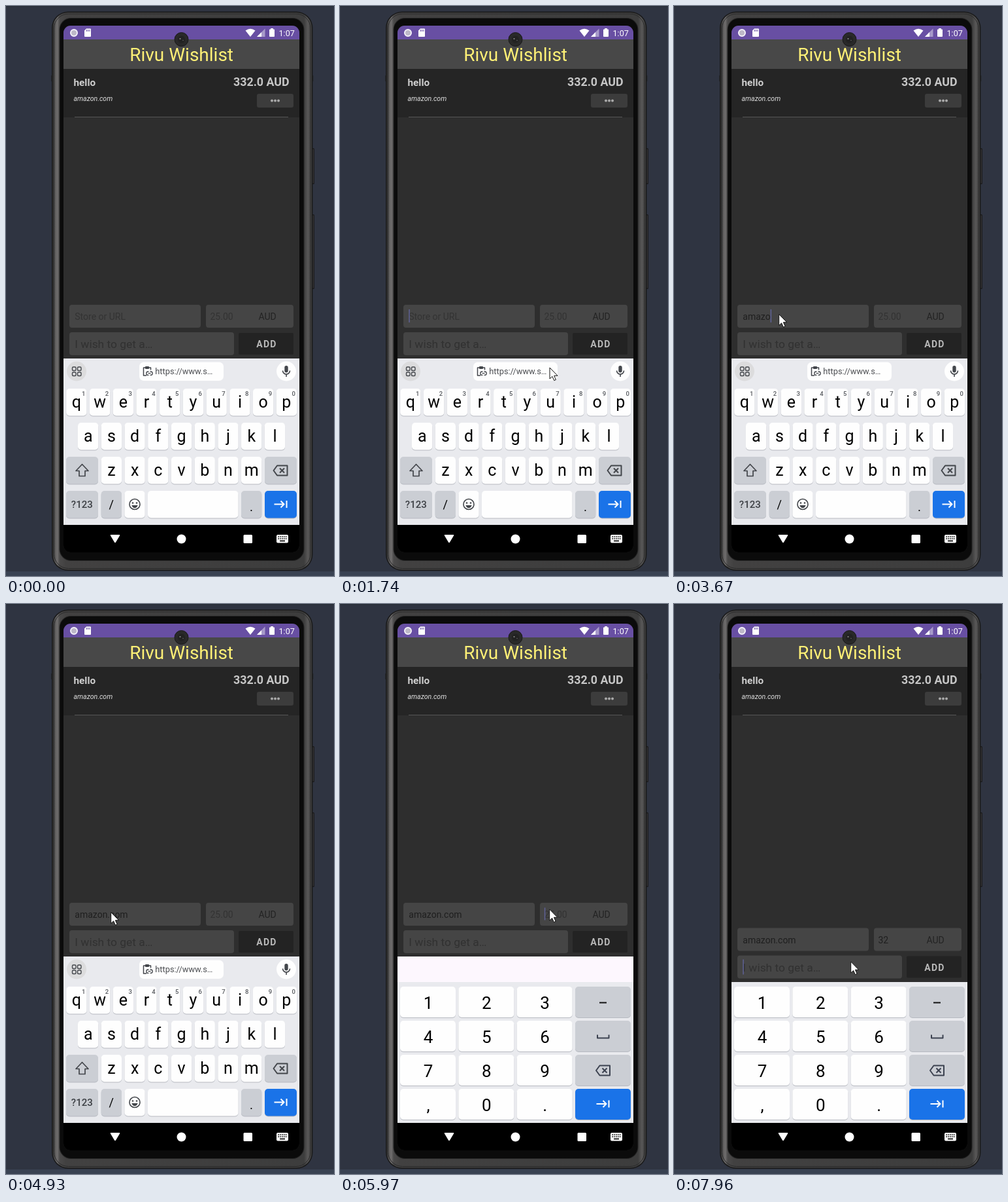
These frames come from a looping animation (502 by 870 pixels, 8000 ms). An HTML page:

```html
<!DOCTYPE html>
<html lang="en">
<head>
<meta charset="utf-8">
<title>Wishlist form</title>
<style>
  html, body { margin: 0; width: 100%; height: 100%; overflow: hidden; background: #2f3441; }
  svg { display: block; width: 100vw; height: 100vh; font-family: Roboto, sans-serif; }
  text { white-space: pre; }
</style>
</head>
<body>
<svg id="stage" viewBox="0 0 502 870" xmlns="http://www.w3.org/2000/svg">
  <defs>
    <linearGradient id="metal" gradientUnits="userSpaceOnUse" x1="72" x2="468" y1="0" y2="0">
      <stop offset="0" stop-color="#333"/>
      <stop offset=".006" stop-color="#545353"/>
      <stop offset=".016" stop-color="#706e6e"/>
      <stop offset=".026" stop-color="#4a4949"/>
      <stop offset=".05" stop-color="#424141"/>
      <stop offset=".97" stop-color="#3d3d3d"/>
      <stop offset=".985" stop-color="#595858"/>
      <stop offset="1" stop-color="#3a3a3a"/>
    </linearGradient>
    <clipPath id="screen"><rect x="88" y="30" width="361" height="804" rx="11"/></clipPath>
  </defs>
  <rect y="863" width="502" height="7" fill="#394252"/>
  <rect width="502" height="1.5" fill="#292e38"/>
  <g id="phone"></g>
  <g clip-path="url(#screen)">
    <g id="app"></g>
    <g id="form"></g>
    <g id="letters"></g>
    <g id="numbers"></g>
    <g id="nav"></g>
  </g>
  <g id="camera"></g>
  <path id="pointer" d="M0 0V17L3.9 13.4L6.7 19.6L9.4 18.4L6.7 12.3H12Z" fill="#fff" stroke="#111" stroke-width="1" stroke-linejoin="round"/>
</svg>
<script>
const LOOP = 8000;
const $ = id => document.getElementById(id);

function add(parent, tag, attrs, content) {
  const el = document.createElementNS("http://www.w3.org/2000/svg", tag);
  for (const k in attrs) el.setAttribute(k, attrs[k]);
  if (content !== undefined) el.textContent = content;
  parent.appendChild(el);
  return el;
}
const box = (g, x, y, width, height, fill, rx = 0, more = {}) =>
  add(g, "rect", { x, y, width, height, fill, rx, ...more });
const dot = (g, cx, cy, r, fill, more = {}) => add(g, "circle", { cx, cy, r, fill, ...more });
const shape = (g, d, fill) => add(g, "path", { d, fill });
const line = (g, d, stroke, w = 1.5) =>
  add(g, "path", { d, stroke, fill: "none", "stroke-width": w, "stroke-linejoin": "round" });
const label = (g, s, x, y, size, fill, more = {}) =>
  add(g, "text", { x, y, "font-size": size, fill, ...more }, s);
const MID = { "text-anchor": "middle" };
const END = { "text-anchor": "end" };

function sideButton(g, y, h) {
  box(g, 467, y, 5, h, "#1b1b1c", 1.5);
  box(g, 469.5, y + 1.5, 1, h - 3, "#4b4b4c");
}

function drawPhone() {
  const g = $("phone");
  sideButton(g, 217, 55);
  sideButton(g, 318, 114);
  box(g, 69, 106, 2, 9, "#26282c");
  box(g, 468.5, 106, 2, 9, "#26282c");
  box(g, 70, 8.5, 399.5, 853.5, "#1a1a1a", 25);
  box(g, 71.5, 10, 396.5, 850.5, "url(#metal)", 23.5);
  box(g, 73.5, 12, 392.5, 846.5, "none", 22, { stroke: "#2a2a2a", "stroke-width": 1 });
  box(g, 81.5, 18, 375, 829, "#262626", 18);
  box(g, 82.5, 19, 373, 827, "#0b0b0b", 17);

  const c = $("camera");
  dot(c, 268.5, 51, 10.5, "#292929", { stroke: "#191919", "stroke-width": 1 });
  dot(c, 268.5, 51, 5.5, "#222");
  dot(c, 266.5, 50, 1.1, "#8a8a8a");
  dot(c, 271, 52.5, .8, "#656565");
}

function drawApp() {
  const g = $("app");
  box(g, 88, 30, 361, 804, "#2e2e2e");
  box(g, 88, 30, 361, 21, "#684fa3");
  dot(g, 104, 41, 5, "#bdb8c8", { stroke: "#f4f1fa", "stroke-width": 2 });
  shape(g, "M123 34.5H129Q130 34.5 130 35.5V46Q130 47 129 47H121Q120 47 120 46V37.5Z", "#fff");
  line(g, "M123.5 36V39M125.7 36V39M127.9 36V39", "#684fa3", 1);
  shape(g, "M366.5 37.5Q374 32 381.5 37.5L374 47Z", "#fff");
  shape(g, "M396.5 34.5V47H384Z", "#a79ac9");
  shape(g, "M391 40V47H384Z", "#fff");
  box(g, 403, 35.5, 8, 11.5, "#fff", 1);
  box(g, 405.2, 34, 3.6, 3, "#fff");
  label(g, "1:07", 417.5, 45.5, 12.6, "#fff");

  box(g, 88, 51, 361, 45, "#484848");
  label(g, "Rivu Wishlist", 348, 84, 28, "#fff176", END);

  box(g, 88, 96, 361, 74, "#252525");
  label(g, "hello", 103.5, 122, 15.3, "#cecece", { "font-weight": 700 });
  label(g, "332.0 AUD", 433.6, 122, 17.8, "#c6c6c6", { ...END, "font-weight": 700 });
  label(g, "amazon.com", 103.5, 145, 10.6, "#dedede", { "font-style": "italic" });
  box(g, 384, 134, 56, 21, "#3c3c3c", 3);
  for (const x of [407, 412, 417]) dot(g, x, 144.5, 2, "#a9a9a9");
  box(g, 105, 169, 327, 1, "#565656");
}

const field = {};
function drawForm() {
  const g = $("form");
  const fill = "#454545";
  box(g, 97, 456, 201, 35, fill, 4);
  box(g, 306, 456, 134, 35, fill, 4);
  box(g, 97, 498, 252, 35, fill, 4);
  field.store = label(g, "", 105.3, 479, 14, "");
  field.price = label(g, "", 312.5, 479, 14, "");
  label(g, "AUD", 386.5, 479, 14, "#232323");
  label(g, "I wish to get a…", 105.3, 522, 17.4, "#313131");
  box(g, 356, 499, 84, 33, "#232323", 2);
  label(g, "ADD", 399, 521, 14, "#b9b9b9", { ...MID, "font-weight": 700, "letter-spacing": 1.25 });
  field.caret = box(g, 0, 0, 1.5, 20, "#5f6296");
}

const LIGHT = "#fefefe", GREY = "#cbced4", BLUE = "#1a73e8";
function key(g, x, y, w, h, fill) {
  box(g, x, y + 1, w, h, "#b7bac1", 5);
  box(g, x, y, w, h, fill, 5);
}
function eraseIcon(g, x, y, color) {
  line(g, `M${x - 10.5} ${y}L${x - 5} ${y - 7.5}H${x + 10.5}V${y + 7.5}H${x - 5}Z`, color, 2);
  line(g, `M${x - 1} ${y - 3.5}l7 7m0 -7l-7 7`, color, 2);
}
function nextIcon(g, x, y) {
  line(g, `M${x - 10} ${y}H${x + 5}M${x} ${y - 5}L${x + 5} ${y}L${x} ${y + 5}M${x + 9} ${y - 5.5}V${y + 5.5}`, "#fff", 2);
}

function drawLetters() {
  const g = $("letters"), ink = "#43464b";
  box(g, 88, 538, 361, 254, "#e9eaee");
  dot(g, 108, 557.5, 15, "#dcdcdd");
  for (const x of [101.5, 109.5]) for (const y of [551, 559])
    box(g, x, y, 5.5, 5.5, "none", 1.5, { stroke: ink, "stroke-width": 1.4 });
  box(g, 204, 543.5, 129, 28.5, LIGHT, 7);
  line(g, "M214 552H210.5V564H215M218 552H221.5V555.5", ink, 1.5);
  box(g, 213, 550, 6, 4, ink, 1);
  line(g, "M218.5 558H217.5a2.7 2.7 0 0 0 0 5.4H218.5M220.5 558H221.5a2.7 2.7 0 0 1 0 5.4H220.5M217.5 560.7H221.5", ink, 1.3);
  label(g, "https://www.s…", 228.3, 562, 12.8, "#4b4d51");
  dot(g, 429, 557.5, 15, LIGHT);
  box(g, 426.3, 549, 5.4, 10.5, ink, 2.7);
  line(g, "M423.5 556.5a5.5 5.5 0 0 0 11 0M429 562V566", ink, 1.6);

  const pitch = 35.72;
  const row = (chars, x, y, each) => [...chars].forEach((c, i) => {
    const left = x + i * pitch;
    key(g, left, y, 31.3, 41.5, LIGHT);
    label(g, c, left + 15.7, y + 28.5, 25, "#000", MID);
    if (each) each(i, left, y);
  });
  row("qwertyuiop", 92.2, 584, (i, x, y) =>
    label(g, (i + 1) % 10, x + 26.5, y + 10.5, 9.5, "#55585d", { ...MID, "font-weight": 500 }));
  row("asdfghjkl", 110, 636);
  row("zxcvbnm", 145.7, 688);

  key(g, 92, 688, 49, 41.5, GREY);
  line(g, "M116.5 699.5L107 709.5H112V717.5H121V709.5H126Z", ink, 1.7);
  key(g, 396, 688, 49, 41.5, GREY);
  eraseIcon(g, 420, 709, ink);

  key(g, 92, 740, 49, 41.5, GREY);
  label(g, "?123", 116.3, 766, 15, "#3d4045", { ...MID, "font-weight": 500 });
  key(g, 145.7, 740, 31.3, 41.5, GREY);
  label(g, "/", 161.3, 767, 18, "#000", MID);
  key(g, 181.4, 740, 31.3, 41.5, LIGHT);
  dot(g, 197, 760.5, 8, "none", { stroke: ink, "stroke-width": 1.6 });
  dot(g, 194, 758.5, 1.3, ink);
  dot(g, 200, 758.5, 1.3, ink);
  shape(g, "M192.3 762H201.7Q200 766.3 197 766.3T192.3 762", ink);
  key(g, 217, 740, 138.5, 41.5, LIGHT);
  key(g, 360, 740, 31.3, 41.5, GREY);
  label(g, ".", 375.6, 771, 19, "#000", MID);
  key(g, 396, 740, 49, 41.5, BLUE);
  nextIcon(g, 420.5, 760.5);
}

let strip;
function drawNumbers() {
  const g = $("numbers"), ink = "#3c4250";
  strip = box(g, 88, 538, 361, 39, "#fdf7fe");
  box(g, 88, 577, 361, 215, "#e9eaee");
  ["123", "456", "789", ",0."].forEach((chars, r) => {
    const y = 584 + r * 52;
    [...chars].forEach((c, i) => {
      const x = 92 + i * 89.3;
      key(g, x, y, 85, 47, LIGHT);
      label(g, c, x + 43, y + 33.5, 26, "#000", MID);
    });
    key(g, 360, y, 85, 47, r < 3 ? GREY : BLUE);
  });
  line(g, "M397 608.5H408", "#111", 2);
  line(g, "M394 657.5V662.5H411.5V657.5", ink, 2);
  eraseIcon(g, 402.5, 712, ink);
  nextIcon(g, 402.5, 763);
}

function drawNav() {
  const g = $("nav");
  box(g, 88, 792, 361, 42, "#000");
  shape(g, "M160.5 807H173.5Q175 807 174 808.5L168 818.5Q167 820 166 818.5L160 808.5Q159 807 160.5 807Z", "#fff");
  dot(g, 268.5, 813.5, 7, "#fff");
  box(g, 363.5, 807, 13.5, 13, "#fff", 1.5);
  box(g, 414, 807, 18, 12.5, "#fff", 2);
  for (const y of [809.3, 812.3])
    for (let i = 0; i < 5; i++) box(g, 416.2 + i * 2.9, y, 1.6, 1.6, "#000");
  box(g, 419, 815.6, 8, 1.7, "#000");
}

// Pointer path: time, x, y
const path = [
  [370, 326, 607], [510, 226, 540], [700, 226, 540], [1120, 119.7, 508.5], [1540, 226, 538],
  [1600, 226, 538], [1740, 321, 552], [1870, 240, 490], [1935, 175, 460], [2000, 160.7, 470.5],
  [4930, 160.7, 470.5], [5480, 308.5, 459], [5679, 308.5, 459], [5680, 320.7, 454.5], [5899, 320.7, 454.5],
  [5900, 320.7, 466], [7080, 320.7, 466], [7760, 270.7, 546]
];
function pointerAt(t) {
  const i = path.findIndex(p => p[0] > t);
  if (i < 0) return path[path.length - 1].slice(1);
  const a = path[i - 1], b = path[i];
  const f = Math.floor((t - a[0]) / 70) * 70 / (b[0] - a[0]);
  return [a[1] + (b[1] - a[1]) * f, a[2] + (b[2] - a[2]) * f];
}

const typing = {
  store: { text: "amazon.com", hint: "Store or URL", keys: [2990, 3190, 3340, 3540, 3670, 3940, 4200, 4290, 4380, 4470] },
  price: { text: "32", hint: "25.00", keys: [6500, 6630] }
};
function typeField(name, t) {
  const { text, hint, keys } = typing[name], el = field[name];
  const n = keys.filter(k => t >= k).length;
  el.textContent = n ? text.slice(0, n) : hint;
  el.setAttribute("fill", n ? "#1f1f1f" : "#333");
  return n ? el.getComputedTextLength() : 0;
}

// Times when the caret shows
const blink = {
  store: [[460, 960], [1460, 1960], [2460, 4930], [5430, 5900]],
  price: [[5900, 6430], [6500, 7080], [7580, 7760]],
  wish: [[7760, LOOP]]
};
const show = (el, on) => el.setAttribute("visibility", on ? "visible" : "hidden");

function render(t) {
  const numeric = t >= 5970, lowered = t >= 6020;
  show($("letters"), !numeric);
  $("numbers").setAttribute("display", numeric ? "inline" : "none");
  show(strip, !lowered);
  $("form").setAttribute("transform", `translate(0 ${lowered ? 38.5 : 0})`);

  const carets = {
    store: [105.3 + typeField("store", t), 463, 20],
    price: [312.8 + typeField("price", t), 463.5, 19],
    wish: [105.3, 504, 23]
  };
  const on = Object.keys(blink).find(k => blink[k].some(([a, b]) => t >= a && t < b));
  show(field.caret, on);
  if (on) ["x", "y", "height"].forEach((k, i) => field.caret.setAttribute(k, carets[on][i]));

  const moving = t >= path[0][0];
  show($("pointer"), moving);
  if (moving) $("pointer").setAttribute("transform", `translate(${pointerAt(t)})`);
}

drawPhone();
drawApp();
drawForm();
drawLetters();
drawNumbers();
drawNav();

const start = performance.now();
function tick() {
  render((performance.now() - start) % LOOP);
  requestAnimationFrame(tick);
}
tick();
</script>
</body>
</html>
```
